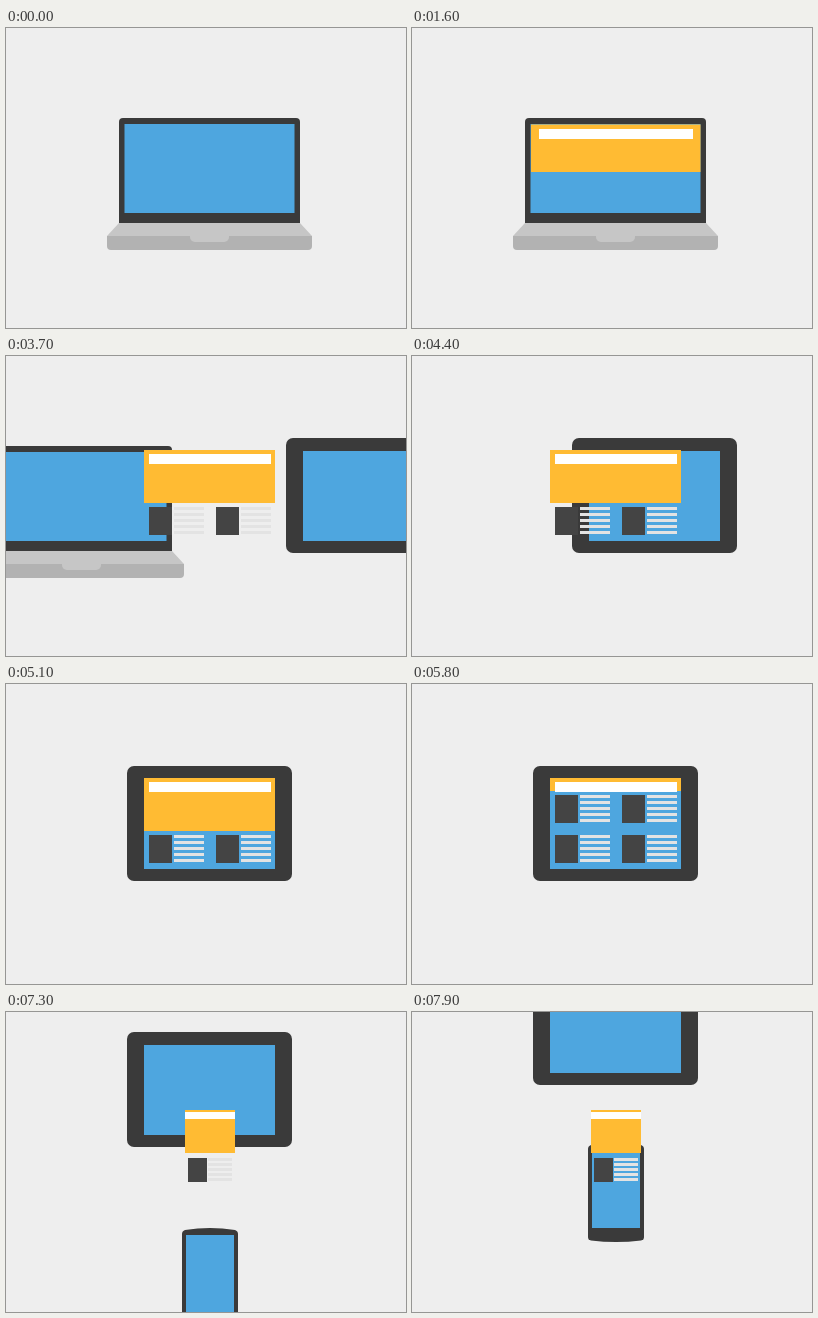
These frames come from a looping animation (400 by 300 pixels, 8 s). An HTML page with a canvas:

```html
<!DOCTYPE html>
<html lang="en">
<head>
<meta charset="utf-8">
<title>Responsive layout</title>
<style>
html, body { margin: 0; width: 100%; height: 100%; overflow: hidden; background: #eee; }
canvas { display: block; }
</style>
</head>
<body>
<canvas id="stage" width="400" height="300"></canvas>
<script>
const ctx = document.getElementById('stage').getContext('2d');
const LOOP = 8000, STEP = 100;
const BLUE = '#4ea6df', YELLOW = '#ffbb33', DARK = '#3a3a3a', PHOTO = '#444', LINE = '#e3e3e3';

function rect(x, y, w, h, color, radius = 0) {
  ctx.fillStyle = color;
  ctx.beginPath();
  ctx.roundRect(x, y, w, h, radius);
  ctx.fill();
}

function shape(path, color) {
  ctx.fillStyle = color;
  ctx.fill(new Path2D(path));
}

// Linear interpolation through [time, value] pairs.
function track(t, ...keys) {
  if (t <= keys[0][0]) return keys[0][1];
  for (let i = 1; i < keys.length; i++) {
    const [t0, a] = keys[i - 1], [t1, b] = keys[i];
    if (t <= t1) return a + (b - a) * (t - t0) / (t1 - t0);
  }
  return keys[keys.length - 1][1];
}

function moved(x, y, draw) {
  ctx.save();
  ctx.translate(x, y);
  draw();
  ctx.restore();
}

function clipped(x, y, w, h, draw) {
  ctx.save();
  ctx.beginPath();
  ctx.rect(x, y, w, h);
  ctx.clip();
  draw();
  ctx.restore();
}

function laptop() {
  rect(113, 90, 181, 105, DARK, [4, 4, 0, 0]);
  rect(118.5, 96, 170, 89, BLUE);
  shape('M113 195H294L306 208H101Z', '#c6c6c6');
  rect(101, 208, 205, 14, '#b2b2b2', [0, 0, 4, 4]);
  rect(184, 207, 39, 7, '#c6c6c6', [0, 0, 5, 5]);
}

function tablet() {
  rect(121, 82, 165, 115, DARK, 7);
  rect(138, 95, 131, 90, BLUE);
}

function phone() {
  shape('M176 97Q176 94 179 93Q204 89 229 93Q232 94 232 97V185Q232 188 229 188.5Q204 191.5 179 188.5Q176 188 176 185Z', DARK);
  rect(180, 98, 48, 78, BLUE);
}

function lines(x, y, w, pitch) {
  for (let i = 0; i < 5; i++) rect(x, y + i * pitch, w, 3, LINE);
}

function laptopPage(t) {
  rect(119, track(t, [300, 300], [1500, 96.5]), 169.5, 47.5, YELLOW);
  rect(track(t, [300, -154], [1300, 127]), track(t, [300, -10], [1300, 101]), 154, 10, '#fff');
  const slide = track(t, [1600, 170], [2700, 0]);
  clipped(118.5, 96, 170, 89, () => {
    for (let x = 127; x < 260; x += 54.5) {
      rect(x - slide, 152, 23, 28, PHOTO);
      lines(x + 25 + slide, 152, 20, 6);
    }
  });
}

function tabletPage(t) {
  const scroll = track(t, [5100, 0], [5800, 40], [6500, 0]);
  clipped(138, 94, 131, 91, () => {
    rect(138, 94, 131, 53 - scroll, YELLOW);
    for (const y of [151, 191]) {
      for (const x of [143, 210]) {
        rect(x, y - scroll, 23, 28, PHOTO);
        lines(x + 25, y - scroll, 30, 6);
      }
    }
    rect(143, 98, 122, 10, '#fff');
  });
}

function phonePage() {
  rect(179, 98, 50, 43, YELLOW);
  rect(179, 100, 50, 7, '#fff');
  rect(182, 146, 19, 24, PHOTO);
  lines(202, 146, 24, 5);
}

function draw(t) {
  rect(0, 0, 400, 300, '#eee');

  const exit = 128 * (Math.max(0, t - 3000) / 700) ** 1.4;
  moved(-exit, 0, laptop);

  // The tablet slides in, settles with a small wobble, then leaves upwards.
  const tabletX = track(t, [3000, 279], [4400, 39], [4600, 6], [4700, -6],
    [4800, -5], [4900, 0], [5000, 4], [5100, 0]);
  const tabletY = track(t, [6700, 0], [7900, -124]);
  if (t >= 3000) moved(tabletX, tabletY, tablet);
  if (t >= 6700) moved(0, track(t, [6700, 210], [7900, 40]), phone);

  if (t < 2900) laptopPage(t);
  else if (t < 6600) tabletPage(t);
  else phonePage();
}

function frame() {
  const t = performance.now() % LOOP;
  draw(Math.floor(t / STEP) * STEP);
  requestAnimationFrame(frame);
}
frame();
</script>
</body>
</html>
```
